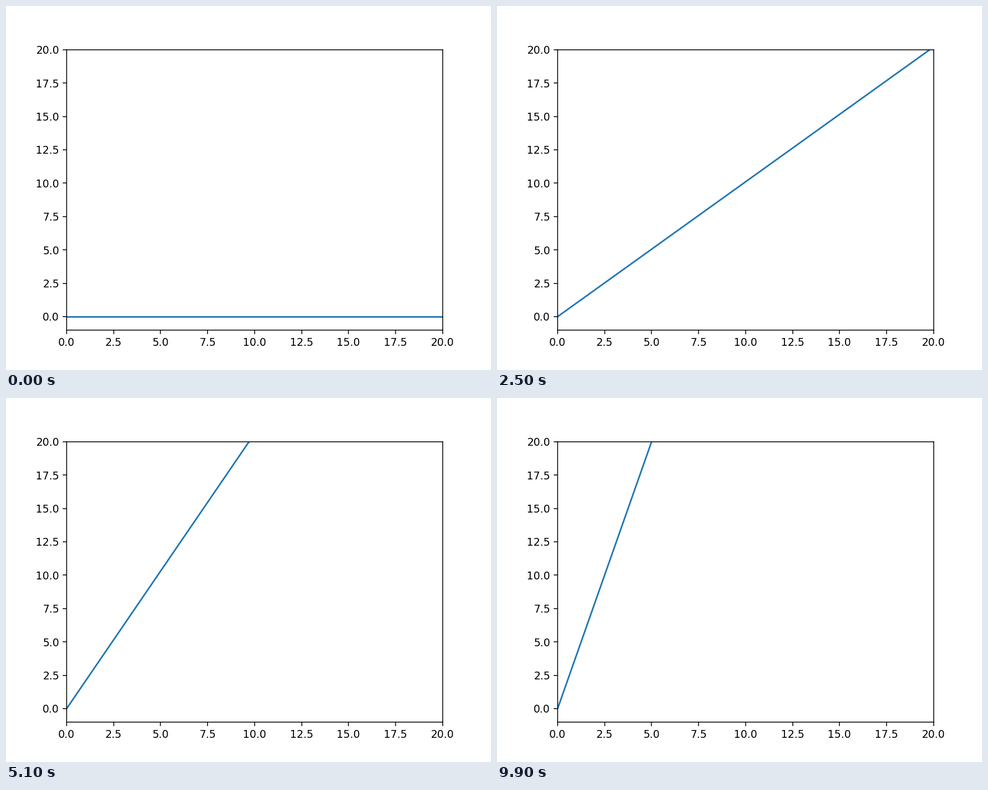
These frames come from a looping animation (864x648 px, 10000 ms). A matplotlib script:

```python
import numpy as np
import matplotlib.pyplot as plt
from matplotlib.animation import FuncAnimation

FRAMES = 100
INTERVAL = 100  # ms
MAX_SLOPE = 4

fig, ax = plt.subplots(figsize=(6.4, 4.8), dpi=135)
ax.set_xlim(0, 20)
ax.set_ylim(-1, 20)

x = np.linspace(0, 20, 100)
slopes = np.linspace(0, MAX_SLOPE, FRAMES)
line, = ax.plot(x, slopes[0] * x)


def update(i):
    line.set_ydata(slopes[i] * x)
    return line,


ani = FuncAnimation(fig, update, frames=FRAMES, interval=INTERVAL,
                    repeat=True, repeat_delay=0)
plt.show()
```
